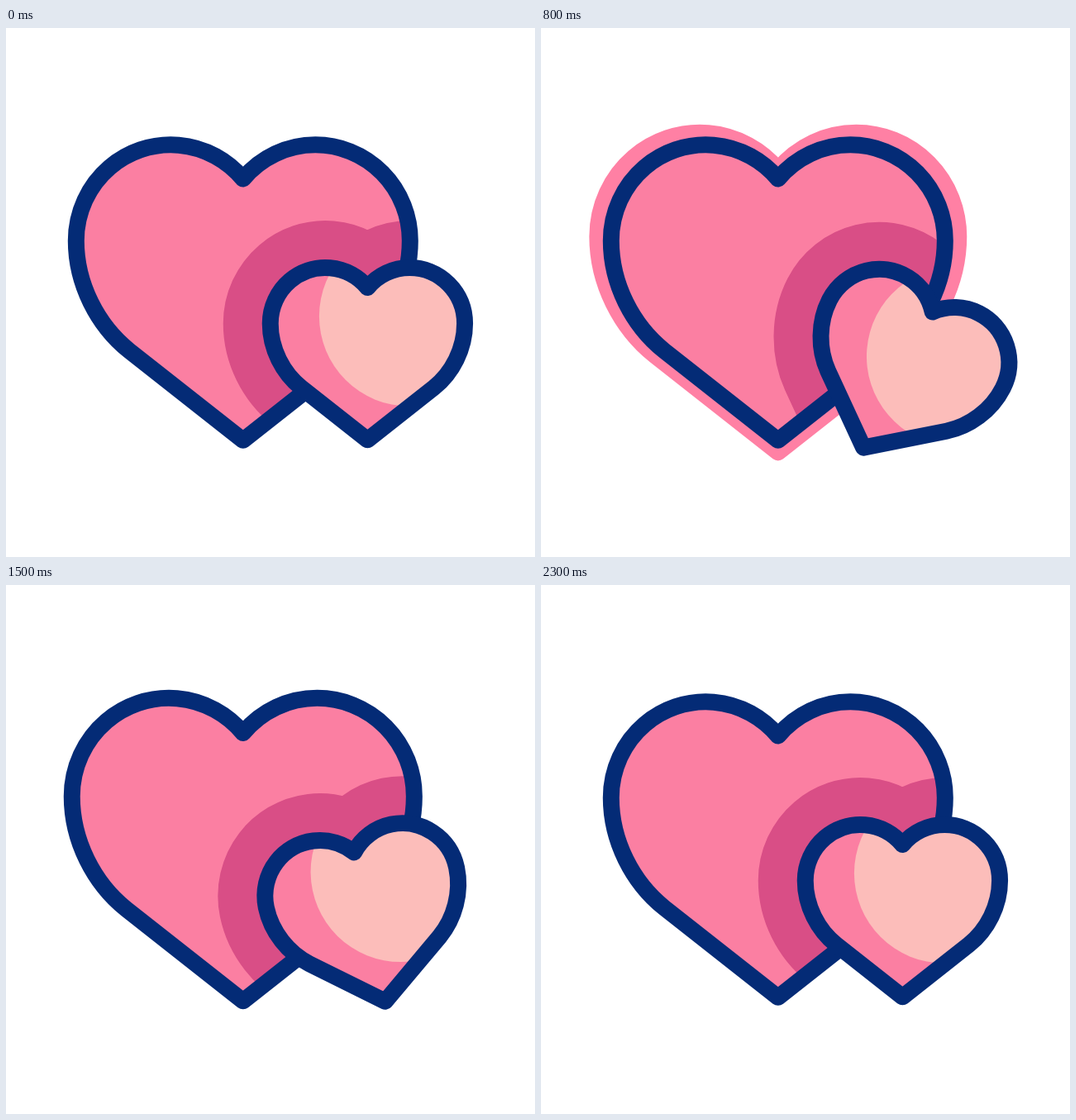
An HTML page with a canvas for the animation above (2400 ms loop, 640 by 640 pixels).

```html
<!DOCTYPE html>
<html lang="en">
<head>
<meta charset="utf-8">
<title>Two hearts</title>
<style>
html, body { margin: 0; width: 100%; height: 100%; overflow: hidden; background: #fff; }
canvas { display: block; width: 100vmin; height: 100vmin; }
</style>
</head>
<body>
<canvas id="stage" width="640" height="640"></canvas>
<script>
const ctx = document.getElementById('stage').getContext('2d');
const LOOP = 2400, STEP = 20, BEAT = 1200;
const PINK = '#fb7fa2', SHADE = '#d94e86', NAVY = '#042b76', LIGHT = '#fcbdba';
const LINE = 20, SHADOW = 114;
const BIG = { x: 286.8, y: 319.8 };
const SMALL = { x: 437.4, y: 394, size: 0.5825 };

// Smooth rise from 0 to 1 that begins at `from` and lasts `span`.
function ease(t, from, span) {
  const p = Math.min(1, Math.max(0, (t - from) / span));
  return p * p * (3 - 2 * p);
}

// Swell, squeeze, and return to rest.
const pulse = b => 1 + 0.05 * ease(b, 200, 200) - 0.13 * ease(b, 400, 200) + 0.08 * ease(b, 600, 200);
const echoSize = b => 0.92 + 0.323 * ease(b, 600, 400);
const echoFade = b => 1 - ease(b, 800, 300);

// Down, up, down, and back to rest.
const bob = t => 26.2 * (ease(t, 200, 500) - 2 * ease(t, 700, 500) + 2 * ease(t, 1200, 500) - ease(t, 1700, 500));

// Each swing is smaller than the last by the damping factor.
function tilt(t) {
  const d = 0.58;
  return 27 * (ease(t, 200, 600) - (1 + d) * ease(t, 800, 600)
    + (d + d * d) * ease(t, 1400, 400) - d * d * ease(t, 1800, 400));
}

// Two round lobes whose sides curve into straight lines to the tip.
function heart({ x, y }, size, degrees = 0) {
  const lobe = 87.5, rx = 114.5, ry = 116, mid = -62.5;
  const side = lobe + rx, tip = 179;
  const notch = Math.acos(lobe / rx);
  const path = new Path2D();
  path.ellipse(-lobe, mid, rx, ry, 0, -notch, Math.PI, true);
  path.bezierCurveTo(-side, -10, -176, 40, -138, 70.4);
  path.lineTo(0, tip);
  path.lineTo(138, 70.4);
  path.bezierCurveTo(176, 40, side, -10, side, mid);
  path.ellipse(lobe, mid, rx, ry, 0, 0, notch - Math.PI, true);
  path.closePath();
  const placed = new Path2D();
  placed.addPath(path, new DOMMatrix().translate(x, y).rotate(degrees).scale(size));
  return placed;
}

function fill(path, color) {
  ctx.fillStyle = color;
  ctx.fill(path);
}

function stroke(path, color, width = LINE) {
  ctx.strokeStyle = color;
  ctx.lineWidth = width;
  ctx.stroke(path);
}

function inside(path, paint) {
  ctx.save();
  ctx.clip(path);
  paint();
  ctx.restore();
}

function draw(t) {
  const b = t % BEAT;
  const spot = { x: SMALL.x, y: SMALL.y + bob(t) };
  const angle = tilt(t);
  const big = heart(BIG, pulse(b));
  const small = heart(spot, SMALL.size, angle);

  ctx.fillStyle = '#fff';
  ctx.fillRect(0, 0, 640, 640);
  ctx.lineJoin = 'round';

  if (b > 600) {
    ctx.globalAlpha = echoFade(b);
    stroke(heart(BIG, echoSize(b)), '#ff80a4');
    ctx.globalAlpha = 1;
  }

  fill(big, PINK);
  inside(big, () => {
    fill(small, SHADE);
    stroke(small, SHADE, SHADOW);
  });
  stroke(big, NAVY);

  fill(small, PINK);
  inside(small, () => {
    ctx.translate(spot.x, spot.y);
    ctx.rotate(angle * Math.PI / 180);
    ctx.fillStyle = LIGHT;
    ctx.beginPath();
    ctx.arc(50.5, -45.3, 109, 0, Math.PI * 2);
    ctx.fill();
  });
  stroke(small, NAVY);
}

const start = performance.now();
function tick() {
  const t = Math.max(0, performance.now() - start) % LOOP;
  draw(Math.floor(t / STEP) * STEP);
  requestAnimationFrame(tick);
}
tick();
</script>
</body>
</html>
```
